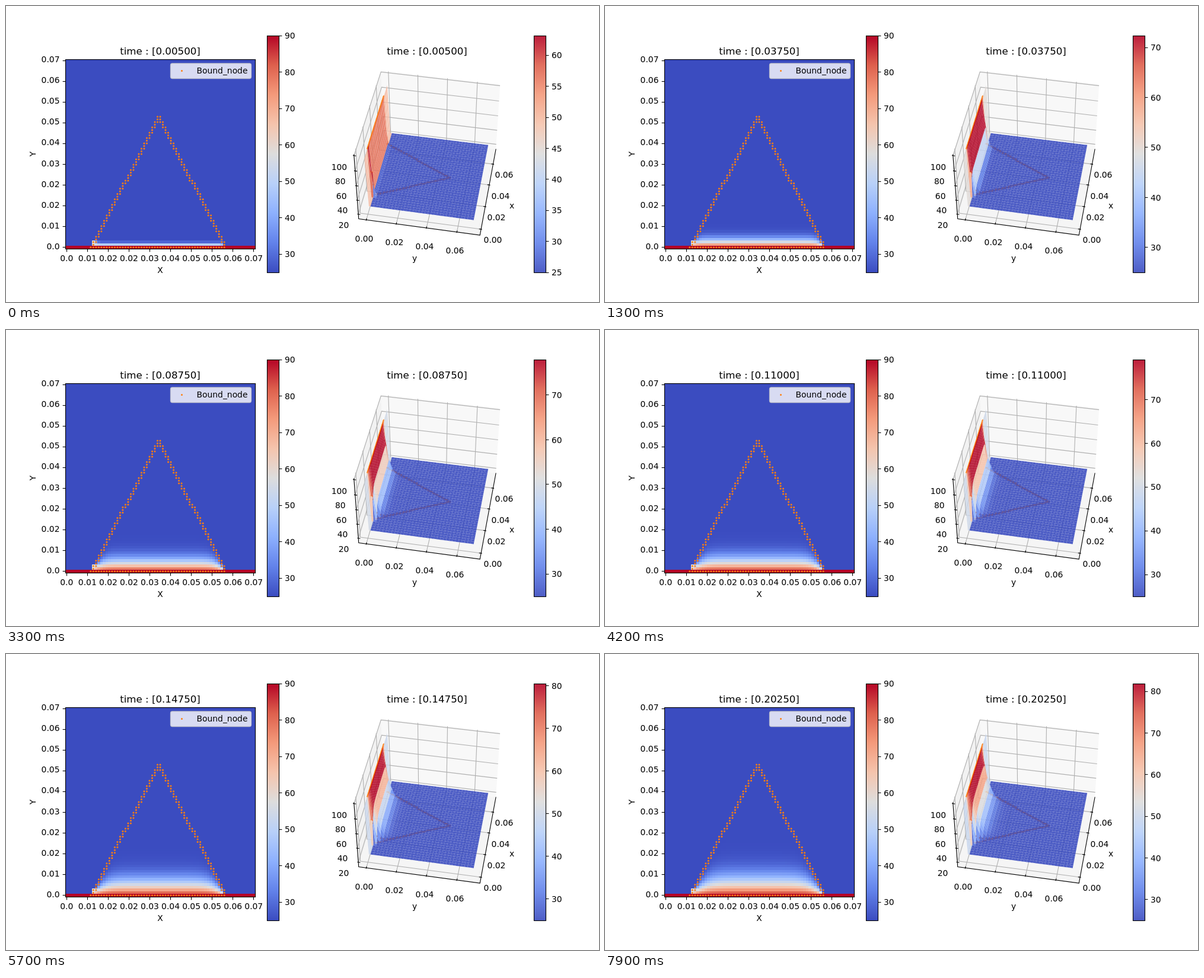
Animation, 1000 px wide and 500 px high, one loop 8000 ms. Source, as an HTML page with a canvas:

```html
<!DOCTYPE html>
<html lang="en">
<head>
<meta charset="utf-8">
<title>Heat diffusion in a triangle</title>
<style>
html, body { margin: 0; width: 100%; height: 100%; overflow: hidden; background: #fff; }
canvas { display: block; }
</style>
</head>
<body>
<canvas id="stage" width="1000" height="500"></canvas>
<script>
const ctx = document.getElementById('stage').getContext('2d');
const N = 71, COLD = 25, HOT = 90, FRAMES = 80, FRAME_MS = 100;
const CELL = 320 / N, LINE = 1.11, ORANGE = '#ff7f0e';
const FONT = '"DejaVu Sans", sans-serif';

// ---- Colour map: blue - grey - red
const STOPS = [[59, 76, 192], [98, 130, 234], [141, 176, 254], [184, 208, 249], [221, 221, 221],
  [245, 196, 173], [244, 154, 123], [222, 96, 77], [180, 4, 38]];
function heatColor(f) {
  const p = Math.min(Math.max(f, 0), 1) * 8, i = Math.min(Math.floor(p), 7);
  return `rgb(${STOPS[i].map((c, k) => Math.round(c + (STOPS[i + 1][k] - c) * (p - i)))})`;
}

// ---- Triangle on the node grid
const leftEdge = y => y >= 26 ? 10 + Math.floor(y / 2) : 9 + Math.ceil(y / 2);
const mirror = x => 69 - x;
const boundNodes = [];
for (let x = 9; x <= 59; x++) boundNodes.push([x, 0]);
for (let y = 1; y < 50; y++) {
  const last = y < 49 ? leftEdge(y + 1) : leftEdge(y);
  for (let x = leftEdge(y); x <= last; x++) boundNodes.push([x, y], [mirror(x), y]);
}

// ---- Explicit heat equation, one step per picture
const RATE = 0.2425;
function diffuse(t) {
  const next = t.slice();
  for (let y = 1; y < 50; y++) {
    for (let x = leftEdge(y) + 1; x < mirror(leftEdge(y)); x++) {
      const i = y * N + x;
      next[i] += RATE * (t[i - 1] + t[i + 1] + t[i - N] + t[i + N] - 4 * t[i]);
    }
  }
  return next;
}
let field = new Float64Array(N * N).fill(COLD);
field.fill(HOT, 0, N);
field[N + 10] = field[2 * N + 10] = (COLD + HOT) / 2;
field = diffuse(field);
const fields = [];
for (let k = 0; k < FRAMES; k++) fields.push(field = diffuse(field));

// ---- Drawing helpers
function text(str, x, y, align = 'center', size = 13.89) {
  ctx.font = `${size}px ${FONT}`;
  ctx.textAlign = align;
  ctx.fillStyle = '#000';
  ctx.fillText(str, x, y);
}
function path(points, close) {
  ctx.beginPath();
  points.forEach(p => ctx.lineTo(p[0], p[1]));
  if (close) ctx.closePath();
}
function line(points, color = '#000') {
  path(points);
  ctx.strokeStyle = color;
  ctx.lineWidth = LINE;
  ctx.stroke();
}
function fill(points, color) {
  path(points, true);
  ctx.fillStyle = color;
  ctx.fill();
}
function dot(x, y) {
  ctx.beginPath();
  ctx.arc(x, y, 1.5, 0, 2 * Math.PI);
  ctx.fillStyle = ORANGE;
  ctx.fill();
}
function frame(x, y, w, h) {
  ctx.strokeStyle = '#000';
  ctx.lineWidth = LINE;
  ctx.strokeRect(x + 0.5, y + 0.5, w, h);
}
const snap = v => Math.floor(v) + 0.5;

function colorBar(x, max, step, alpha) {
  const gradient = ctx.createLinearGradient(0, 450, 0, 50);
  for (let i = 0; i <= 8; i++) gradient.addColorStop(i / 8, heatColor(i / 8));
  ctx.globalAlpha = alpha;
  ctx.fillStyle = gradient;
  ctx.fillRect(x, 50, 20, 400);
  ctx.globalAlpha = 1;
  frame(x, 50, 20, 400);
  for (let t = Math.ceil(COLD / step) * step; t <= max; t += step) {
    const y = 450 - (t - COLD) / (max - COLD) * 400;
    line([[x + 20.5, snap(y)], [x + 25.4, snap(y)]]);
    text(t, x + 30, y + 5.2, 'left');
  }
}

// ---- Left: flat map
function drawMap(temp) {
  ctx.fillStyle = heatColor(0);
  ctx.fillRect(100, 90, 320, 320);
  for (let y = 0; y < 50; y++) {
    const top = Math.round(410 - (y + 1) * CELL), bottom = Math.round(410 - y * CELL);
    for (let x = 0; x < N; x++) {
      const t = temp[y * N + x];
      if (t <= COLD) continue;
      const left = Math.round(100 + x * CELL), right = Math.round(100 + (x + 1) * CELL);
      ctx.fillStyle = heatColor((t - COLD) / (HOT - COLD));
      ctx.fillRect(left, top, right - left, bottom - top);
    }
  }
  boundNodes.forEach(([x, y]) => dot(100 + (x + 0.5) * CELL, 410 - (y + 0.5) * CELL));
  frame(100, 90, 320, 320);

  for (let i = 0; i < 10; i++) {
    const offset = (i * 70 / 9 + 0.5) * CELL;
    const label = i ? (i * 0.07 / 9).toFixed(2) : '0.0';
    line([[snap(100 + offset), 410.5], [snap(100 + offset), 415.4]]);
    line([[95.6, snap(410 - offset)], [100.5, snap(410 - offset)]]);
    text(label, 100 + offset, 431);
    text(label, 90.5, 413 - offset, 'right');
  }
  text('X', 260, 451);
  ctx.save();
  ctx.translate(50, 250);
  ctx.rotate(-Math.PI / 2);
  text('Y', 0, 0);
  ctx.restore();

  ctx.beginPath();
  ctx.roundRect(277.5, 97, 136, 25.5, 3);
  ctx.fillStyle = 'rgba(255,255,255,.8)';
  ctx.fill();
  ctx.strokeStyle = 'rgba(204,204,204,.8)';
  ctx.lineWidth = 1.39;
  ctx.stroke();
  dot(296.5, 109.5);
  text('Bound_node', 321.5, 114, 'left');
}

// ---- Right: perspective surface
const TURN = 10 * Math.PI / 180, TILT = Math.SQRT1_2;
const SIDE = 0.595, TALL = 0.446;
function project(x, y, z) {
  const across = x * Math.sin(TURN) + y * Math.cos(TURN);
  const ahead = x * Math.cos(TURN) - y * Math.sin(TURN);
  const depth = 10 + (ahead - z) * TILT;
  return [714.3 + 1730 * across / depth, 245.7 - 1730 * (ahead + z) * TILT / depth, depth];
}
const nodePos = i => (i / 35 - 1) * 0.5195;
const heightPos = t => ((t - 15) / 85 - 0.5) * 0.857;
const node = (x, y, t) => project(nodePos(x), nodePos(y), heightPos(t));

function drawBox() {
  const a = project(-SIDE, -SIDE, -TALL), b = project(-SIDE, SIDE, -TALL);
  const c = project(SIDE, SIDE, -TALL), d = project(SIDE, -SIDE, -TALL);
  const aTop = project(-SIDE, -SIDE, TALL), cTop = project(SIDE, SIDE, TALL);
  const dTop = project(SIDE, -SIDE, TALL);
  fill([d, c, cTop, dTop], '#f8f8f8');
  fill([a, d, dTop, aTop], '#f2f2f2');
  fill([a, b, c, d], '#f5f5f5');

  const grid = '#b0b0b0';
  const ticks = [];
  for (let i = 0; i <= 60; i += 20) {
    const p = nodePos(i);
    line([project(p, SIDE, -TALL), project(p, -SIDE, -TALL), project(p, -SIDE, TALL)], grid);
    line([project(-SIDE, p, -TALL), project(SIDE, p, -TALL), project(SIDE, p, TALL)], grid);
    ticks.push([project(p, SIDE - 0.019, -TALL), project(p, SIDE + 0.01, -TALL)]);
    ticks.push([project(-SIDE + 0.019, p, -TALL), project(-SIDE - 0.01, p, -TALL)]);
  }
  for (let t = 20; t <= 100; t += 20) {
    const z = heightPos(t);
    line([project(-SIDE, -SIDE, z), project(SIDE, -SIDE, z), project(SIDE, SIDE, z)], grid);
    ticks.push([project(-SIDE, -SIDE + 0.019, z), project(-SIDE, -SIDE - 0.01, z)]);
  }
  line([aTop, a, b, c]);
  ticks.forEach(t => line(t));

  const xLabels = [[821, 400], [827, 362], [834, 326], [840, 290]];
  xLabels.forEach(([x, y], i) => {
    const label = (i * 0.02).toFixed(2);
    text(label, x, y);
    text(label, 604 + i * 51, 397.5 + i * 6.8);
  });
  for (let i = 0; i < 5; i++) text(20 + i * 20, 569.5 - i * 1.9, 375 - i * 24.6);
  text('x', 853, 342);
  text('y', 689, 431);
}

// Each patch spans two cells; its colour is the mean along its outline.
const OUTLINE = [[0, 0], [1, 0], [2, 0], [2, 1], [2, 2], [1, 2], [0, 2], [0, 1]];
function makePatches(temp) {
  const patches = [];
  for (let y = 0; y < N - 1; y += 2) {
    for (let x = 0; x < N - 1; x += 2) {
      let sum = 0, depth = 0;
      const points = OUTLINE.map(([dx, dy]) => {
        const t = temp[(y + dy) * N + x + dx], p = node(x + dx, y + dy, t);
        sum += t;
        depth += p[2];
        return p;
      });
      patches.push({ points, depth, mean: sum / 8 });
    }
  }
  return patches.sort((p, q) => q.depth - p.depth);
}

function drawSurface(temp) {
  const patches = makePatches(temp);
  const max = Math.max(...patches.map(p => p.mean));
  drawBox();
  boundNodes.forEach(([x, y]) => {
    const p = node(x, y, temp[y * N + x]);
    dot(p[0], p[1]);
  });
  ctx.globalAlpha = 0.9;
  patches.forEach(p => fill(p.points, heatColor((p.mean - COLD) / (max - COLD))));
  ctx.globalAlpha = 1;
  colorBar(890, max, max - COLD <= 45 ? 5 : 10, 0.9);
}

function draw(k) {
  ctx.fillStyle = '#fff';
  ctx.fillRect(0, 0, 1000, 500);
  const title = `time : [${(0.005 + k * 0.0025).toFixed(5)}]`;
  drawMap(fields[k]);
  colorBar(440, HOT, 10, 1);
  drawSurface(fields[k]);
  text(title, 260, 82, 'center', 16.67);
  text(title, 710, 82, 'center', 16.67);
}

let shown = -1;
const start = performance.now();
function tick() {
  const k = Math.floor((performance.now() - start) / FRAME_MS) % FRAMES;
  if (k !== shown) draw(shown = k);
  requestAnimationFrame(tick);
}
tick();
</script>
</body>
</html>
```
